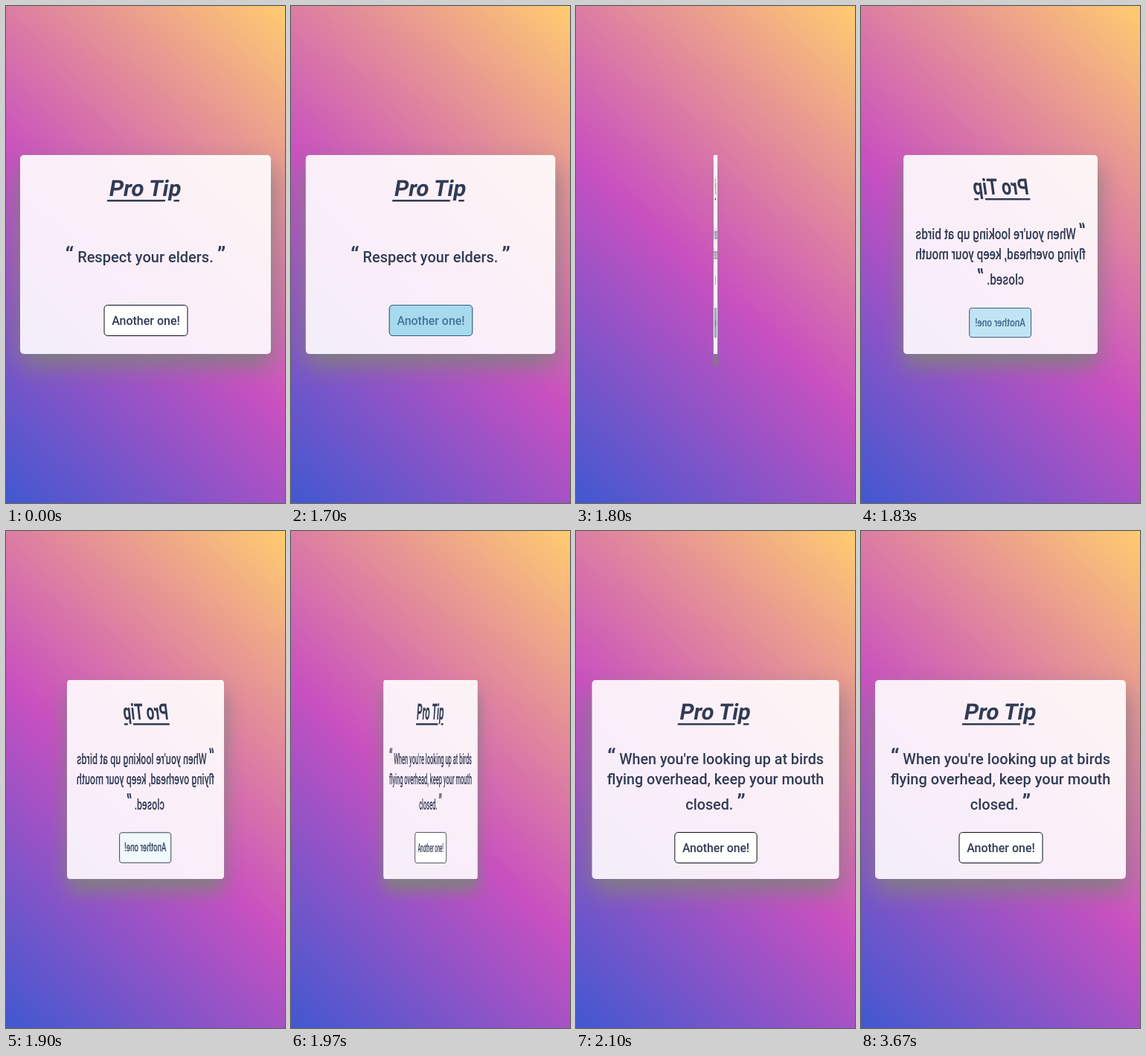
These frames come from a looping animation (375x667 px, 5240 ms). An HTML page:

```html
<!DOCTYPE html>
<html lang="en">
<head>
<meta charset="utf-8">
<title>Pro Tip</title>
<style>
  html, body { margin: 0; width: 100%; height: 100%; overflow: hidden; }
  body { background: linear-gradient(43deg, #4158d0 0%, #c850c0 46%, #ffcc70 100%); }
  #flip, svg { position: absolute; left: 0; top: 0; width: 375px; height: 667px; }
  .card {
    position: absolute; left: 18.75px; top: 200.1px; width: 337.5px; height: 266.8px;
    border-radius: 5px; background: rgba(255, 255, 255, .9); box-shadow: 0 16px 32px gray;
  }
  text { font: 500 20px Roboto, sans-serif; text-anchor: middle; }
  svg { fill: #313b55; }
  .title { font-size: 30px; font-weight: 700; }
  .mark { font-size: 30px; }
  .label { font-size: 16px; }
</style>
</head>
<body>
<div id="flip">
  <div class="card"></div>
  <svg viewBox="0 0 375 667">
    <g id="title">
      <text class="title" y="11">Pro Tip</text>
      <path d="M-48.5 16h78v2.6h-78zM41 16h7.5v2.6h-7.5z"/>
    </g>
    <g id="tipA">
      <text x="187.5" y="344"><tspan class="mark">“</tspan> Respect your elders. <tspan class="mark">”</tspan></text>
    </g>
    <g id="tipB">
      <text x="187.5" y="313"><tspan class="mark">“</tspan> When you're looking up at birds</text>
      <text x="187.5" y="340">flying overhead, keep your mouth</text>
      <text x="187.5" y="374">closed. <tspan class="mark">”</tspan></text>
    </g>
    <g id="button">
      <rect x="-56" y="-20.5" width="112" height="41" rx="4.5" fill="#fff" stroke="#0c0f18"/>
      <text class="label" y="5.5">Another one!</text>
      <rect id="tap" x="-56.5" y="-21" width="113" height="42" rx="5" fill="#51b3df"/>
    </g>
  </svg>
</div>
<script>
const LOOP = 5240, CLICK = 1700, REST = 3670, LAST = 12;
const $ = id => document.getElementById(id);
const clamp = (v, lo, hi) => Math.min(hi, Math.max(lo, v));

// cubic-bezier(.26, .1, .29, 1)
function ease(x) {
  const bez = (a, b, u) => 3 * a * u * (1 - u) ** 2 + 3 * b * u * u * (1 - u) + u ** 3;
  let lo = 0, hi = 1;
  for (let n = 0; n < 30; n++) {
    const mid = (lo + hi) / 2;
    if (bez(.263, .292, mid) < x) lo = mid; else hi = mid;
  }
  return bez(.1, 1, lo);
}

// Thirty steps a second, on a 10 ms clock; -1 before the click
function stepAt(t) {
  if (t < CLICK) return -1;
  const dt = t - CLICK, part = dt % 100;
  return Math.min(LAST, Math.floor(dt / 100) * 3 + (part >= 70 ? 2 : part >= 30 ? 1 : 0));
}

function draw(t) {
  const i = stepAt(t), isNew = i > 0;
  const turning = i >= 0 && t < REST;
  const turn = turning ? ease(Math.max(.03, (i - .157) / 14.8)) : 0;
  const press = turning ? clamp(Math.min(i / 2, (7 - i) / 3), 0, 1) : 0;
  $('flip').style.transform = `scaleX(${Math.cos(turn * 2 * Math.PI)})`;
  $('title').setAttribute('transform', `translate(187.5 ${isNew ? 242 : 244}) skewX(-10)`);
  $('tipA').style.display = isNew ? 'none' : '';
  $('tipB').style.display = isNew ? '' : 'none';
  $('button').setAttribute('transform',
    `translate(188 ${isNew ? 425 : 422}) scale(${1 - .045 * press})`);
  $('tap').style.opacity = turning ? clamp(.5 - .14 * (i - 3), 0, .5) : 0;
}

const start = performance.now();
function frame() {
  draw((performance.now() - start) % LOOP);
  requestAnimationFrame(frame);
}
frame();
</script>
</body>
</html>
```
